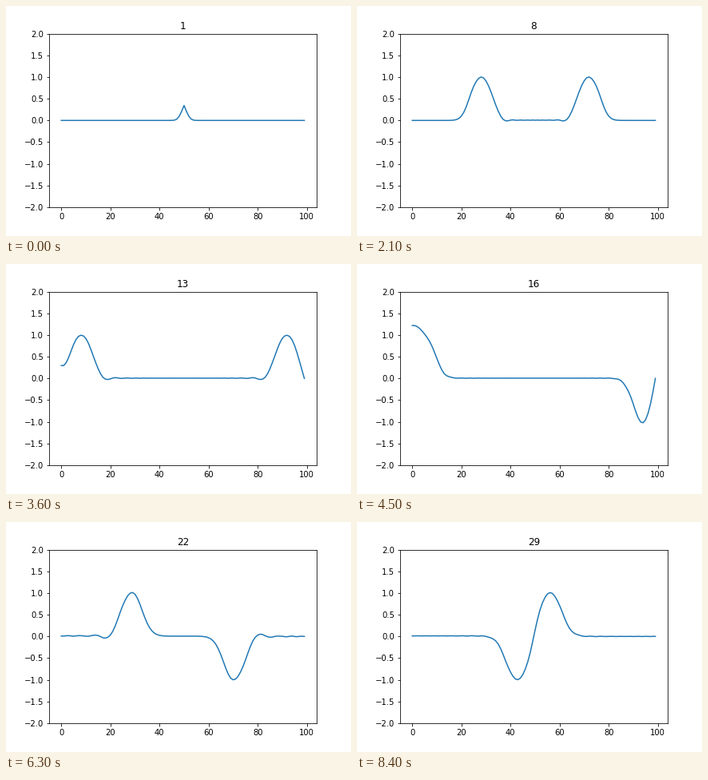
A matplotlib script that plays this animation: 432x288 px, repeating every 8.7 s.

```python
import numpy as np
import matplotlib.pyplot as plt
from matplotlib.animation import FuncAnimation

CELLS = 100
SOURCE = 50
FRAMES = 29
STEPS = 40         # time steps per frame
COURANT = 0.1      # cells travelled per time step
PULSE = 5          # pulse length in frames


def simulate():
    """Wave on a string: pulsed in the middle, free left end, fixed right end."""
    u = np.zeros(CELLS)
    prev = u.copy()
    history = []
    for step in range(1, FRAMES * STEPS + 1):
        new = np.zeros(CELLS)
        bend = u[2:] - 2 * u[1:-1] + u[:-2]
        new[1:-1] = 2 * u[1:-1] - prev[1:-1] + COURANT**2 * bend
        t = step / STEPS
        if t <= PULSE:
            new[SOURCE] = np.sin(np.pi * t / PULSE) ** 2
        new[0] = new[1]
        prev, u = u, new
        if step % STEPS == 0:
            history.append(u)
    return history


waves = simulate()

plt.rcParams["font.family"] = "DejaVu Sans"
fig, ax = plt.subplots(figsize=(6, 4), dpi=72)
fig.subplots_adjust(left=0.125, right=0.9, bottom=0.125, top=0.88)
line, = ax.plot(waves[0], color="#1f77b4", linewidth=1.5)
ax.set_ylim(-2, 2)
title = ax.set_title("1")


def draw(i):
    line.set_ydata(waves[i])
    title.set_text(str(i + 1))
    return line, title


anim = FuncAnimation(fig, draw, frames=FRAMES, interval=300,
                     repeat=True, repeat_delay=0, blit=False)
plt.show()
```
